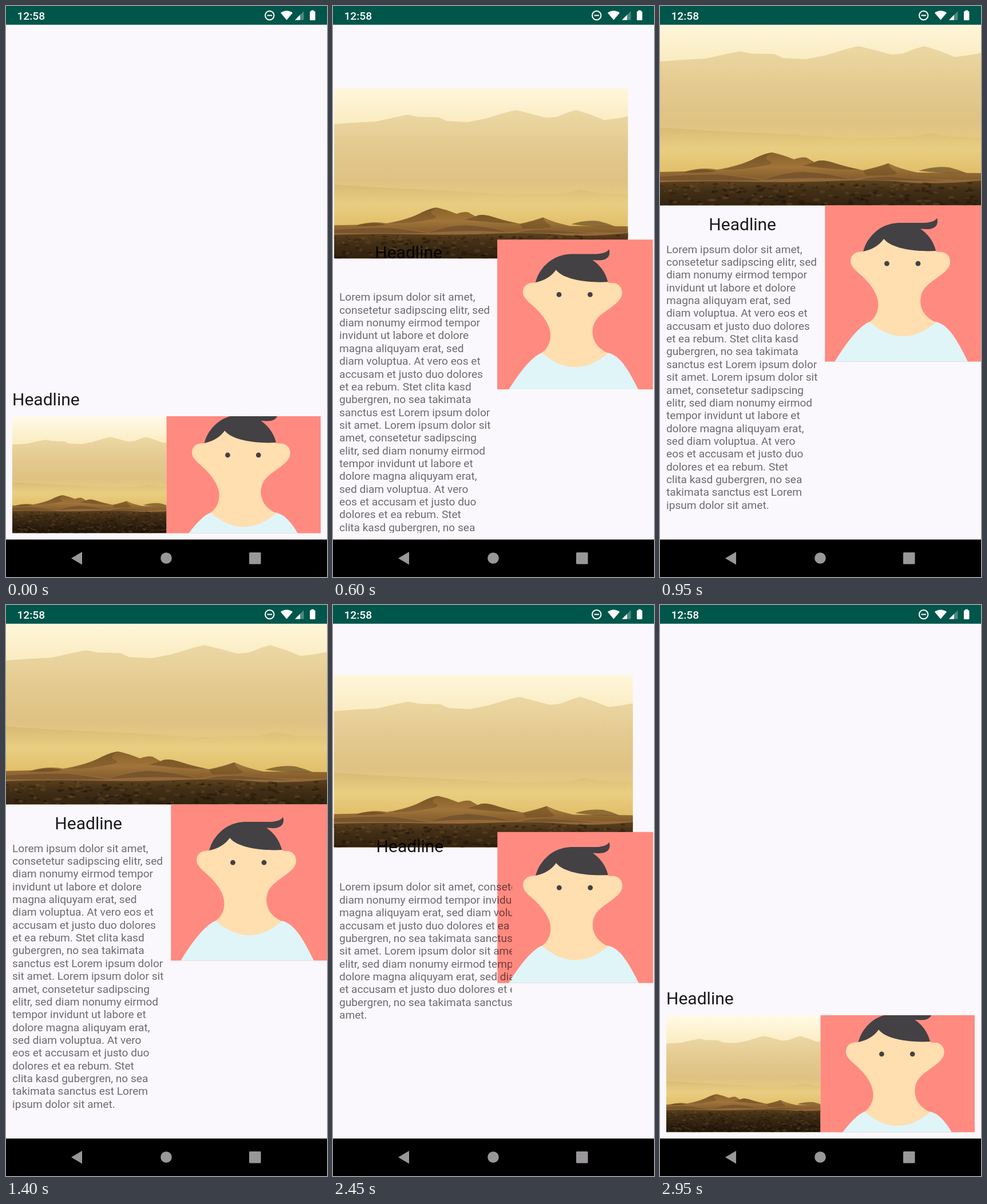
Write an HTML page that moves like this. It is 561 by 998 pixels and loops after 3 s.

```html
<!DOCTYPE html>
<html lang="en">
<head>
<meta charset="utf-8">
<title>Layout transition</title>
<style>
  html, body { margin: 0; width: 100%; height: 100%; overflow: hidden; background: #faf8fc; }
  svg { display: block; }
  text { font-family: Roboto, sans-serif; white-space: pre; }
</style>
</head>
<body>
<svg width="561" height="998" viewBox="0 0 561 998">
  <defs>
    <linearGradient id="sky" gradientUnits="userSpaceOnUse" x1="0" y1="4" x2="0" y2="100">
      <stop offset="0" stop-color="#fffbe9"/>
      <stop offset=".35" stop-color="#fef5d8"/>
      <stop offset="1" stop-color="#faebbf"/>
    </linearGradient>
    <linearGradient id="range" gradientUnits="userSpaceOnUse" x1="0" y1="70" x2="0" y2="300">
      <stop offset="0" stop-color="#ecd8a4"/>
      <stop offset=".3" stop-color="#e4ca90"/>
      <stop offset=".58" stop-color="#dfc283"/>
      <stop offset=".78" stop-color="#e9ce82"/>
      <stop offset="1" stop-color="#e0bc64"/>
    </linearGradient>
    <linearGradient id="hill" gradientUnits="userSpaceOnUse" x1="0" y1="218" x2="0" y2="256">
      <stop offset="0" stop-color="#cfac60" stop-opacity=".35"/>
      <stop offset="1" stop-color="#e6c870" stop-opacity="0"/>
    </linearGradient>
    <linearGradient id="dune" gradientUnits="userSpaceOnUse" x1="0" y1="256" x2="0" y2="308">
      <stop offset="0" stop-color="#8a622b"/>
      <stop offset=".5" stop-color="#a0743a"/>
      <stop offset="1" stop-color="#7c5728"/>
    </linearGradient>
    <linearGradient id="scrub" gradientUnits="userSpaceOnUse" x1="0" y1="304" x2="0" y2="378">
      <stop offset="0" stop-color="#5e431e"/>
      <stop offset=".25" stop-color="#432f16"/>
      <stop offset="1" stop-color="#20150a"/>
    </linearGradient>
  </defs>

  <svg id="desert" viewBox="0 3.8 561 374" preserveAspectRatio="xMidYMid slice">
    <path fill="url(#sky)" d="M0 3H561V378H0Z"/>
    <path fill="url(#range)" d="M0 97L40 94 80 92 115 84 140 79 160 83 200 84 215 91 255 93 290 86 330 74 347 70 375 77 405 85 425 83 445 75 462 70 490 79 515 89 540 86 561 82V378H0Z"/>
    <path fill="url(#hill)" d="M0 212L90 218 220 224 330 231 440 229 470 222 510 229 561 230V258H0Z"/>
    <path fill="url(#dune)" d="M0 290L45 289Q75 281 100 286 145 278 168 265 185 257 196 256 215 260 234 268 248 263 256 265L270 273Q280 267 300 273 330 283 355 287 382 281 399 275 420 285 450 291L561 292V312H0Z"/>
    <g fill="#6a4a20" opacity=".7">
      <path d="M108 286Q145 278 168 265 185 257 196 256 182 263 187 269 205 276 180 279 145 287 108 286Z" opacity=".6"/>
      <path d="M270 273Q280 267 300 273 325 281 350 286 310 287 250 279Z" opacity=".8"/>
      <path d="M355 288Q382 282 399 275 400 282 412 290 425 297 360 296Z" opacity=".7"/>
      <path d="M452 288Q480 279 505 282 522 286 536 292 500 294 452 288Z"/>
      <path d="M40 291Q75 281 98 289 70 293 40 291Z"/>
    </g>
    <path fill="#94693a" d="M0 297Q60 292 110 294 150 298 180 303 215 290 250 289 300 292 336 303 370 295 410 298 480 305 561 303V315H0Z"/>
    <path fill="#5f431f" opacity=".5" d="M0 298Q60 294 110 295 145 299 180 305H0ZM180 304Q215 291 250 290 300 293 332 303 260 298 180 304ZM345 304Q380 297 410 299L500 306Z"/>
    <path fill="url(#scrub)" d="M0 308Q80 305 150 307T300 306 430 308 561 305V378H0Z"/>
    <g id="bushes"></g>
  </svg>

  <svg id="face" viewBox="288 348.5 273 273" preserveAspectRatio="xMidYMid slice">
    <path fill="#ff8a80" d="M280 340H570V630H280Z"/>
    <path fill="#e0f5f8" d="M305 622C318 600 345 560 366 552H482C505 557 520 586 538 622Z"/>
    <path fill="#ffdeb0" d="M349 429.500C340 430 332 437 333 447 334 460 352 468 366 486 379 502 384 518 380 532 377 542 372 548 366 552Q424 602 482 553C462 543 455 530 455 514 456 500 462 492 472 484 487 472 507 462 507 447 507 437 500 429 488 430L482 429C470 395 450 385 420 385 390 385 365 400 356 429Z"/>
    <path fill="#434144" d="M355 429A66 66 0 0 1 416 379L462 379Q480 378 484 370.500C487 382 482 390 466 390L455 389.500A66 66 0 0 1 482 428C450 430 405 425 391 407Q379 424 355 429Z"/>
    <g fill="#434144"><circle cx="396.300" cy="450.200" r="4.400"/><circle cx="450.800" cy="450.200" r="4.400"/></g>
  </svg>

  <text id="headline" font-size="30.030" fill-opacity=".9">Headline</text>
  <svg id="body" x="11" font-size="19.110" fill-opacity=".57">
    <text id="narrow"></text>
    <text id="wide"></text>
  </svg>

  <path fill="#00564b" d="M0 0H561V32.700H0Z"/>
  <g fill="#fff">
    <text x="19.500" y="24" font-size="19.110" font-weight="500">12:58</text>
    <path fill="none" stroke="#fff" stroke-width="2" d="M453 16.500a7.700 7.700 0 1 0 15.400 0a7.700 7.700 0 1 0-15.400 0M456.500 16.500H465"/>
    <path d="M480 12Q490.500 4.500 501 12L490.500 24.500Z"/>
    <path opacity=".3" d="M505 24.500H520.500V9Z"/>
    <path d="M505 24.500H514V15.500Z"/>
    <path d="M531 10.500q0-1.500 1.500-1.500H533.500V7.500H538V9H539q1.500 0 1.500 1.500V23.500q0 1.500-1.500 1.500H532.500q-1.500 0-1.500-1.500Z"/>
  </g>
  <path d="M0 932.500H561V998H0Z"/>
  <g fill="#999799">
    <path d="M114 965.300L133 954V976.600Z"/>
    <circle cx="280" cy="965" r="9.800"/>
    <rect x="425" y="955" width="20.500" height="20.500" rx="1.500"/>
  </g>
</svg>
<script>
const $ = id => document.getElementById(id);
const ns = 'http://www.w3.org/2000/svg';
const set = (node, attrs) => { for (const k in attrs) node.setAttribute(k, attrs[k]); };
const add = (parent, tag, attrs) => {
  const node = parent.appendChild(document.createElementNS(ns, tag));
  set(node, attrs);
  return node;
};

// Line breaks: "|" narrow column only, "+" wide column only, "/" both.
const copy = 'Lorem ipsum dolor sit amet,|consetetur sadipscing elitr, sed/diam nonumy eirmod tempor|'
  + 'invidunt ut labore et dolore/magna aliquyam erat, sed|diam voluptua. At vero eos et/'
  + 'accusam et justo duo dolores|et ea rebum. Stet clita kasd/gubergren, no sea takimata|'
  + 'sanctus est Lorem ipsum dolor/sit amet. Lorem ipsum dolor sit|amet, consetetur sadipscing/'
  + 'elitr, sed diam nonumy eirmod|tempor invidunt ut labore et/dolore magna aliquyam erat,|'
  + 'sed diam voluptua. At vero|eos+et accusam et justo duo|dolores et ea rebum. Stet|'
  + 'clita kasd+gubergren, no sea|takimata sanctus est Lorem|ipsum dolor sit+amet.';

function fill(id, lines) {
  lines.forEach((line, i) => {
    add($(id), 'tspan', { x: 0, y: 19.5 + i * 22.35 }).textContent = line;
  });
}
fill('narrow', copy.replaceAll('+', ' ').split(/[|/]/));
fill('wide', copy.replaceAll('|', ' ').split(/[+/]/));

let seed = 7;
const random = () => (seed = seed * 16807 % 2147483647) / 2147483647;
for (let i = 0; i < 420; i++) {
  const depth = random();
  add($('bushes'), 'ellipse', {
    cx: random() * 561, cy: 309 + depth * 68,
    rx: 1.5 + random() * 4 + depth * 2, ry: 1 + random() * 1.5 + depth,
    fill: i % 3 ? '#150d05' : '#7a5829', opacity: .3
  });
}

const duration = 530, forward = 88, back = 2055;
const anticipate = u => {
  u = Math.min(1, Math.max(0, u));
  return u * u * (3 * u - 2);
};

function draw(t) {
  const returning = t >= back;
  const p = returning ? 1 - anticipate((t - back) / duration) : anticipate((t - forward) / duration);
  const mix = (a, b) => a + (b - a) * p;
  const place = (id, left, top, right, bottom) =>
    set($(id), { x: left, y: top, width: right - left, height: bottom - top });

  place('desert', mix(11, 0), mix(717, 33), mix(280.5, 561), mix(921.5, 348.5));
  place('face', mix(280.5, 288.3), mix(717, 348.5), mix(550, 561), mix(921.5, 621.5));
  set($('headline'), { x: mix(11, 85.3), y: mix(697.7, 391.6) });
  set($('body'), { y: mix(929.5, 412.2), width: mix(539, 266), height: mix(180, 472) });
  set($('narrow'), { display: returning ? 'none' : 'inline' });
  set($('wide'), { display: returning ? 'inline' : 'none' });
}

const start = performance.now();
function tick() {
  const t = (performance.now() - start) % 3000;
  draw(Math.floor(t / 50) * 50);
  requestAnimationFrame(tick);
}
tick();
</script>
</body>
</html>
```
